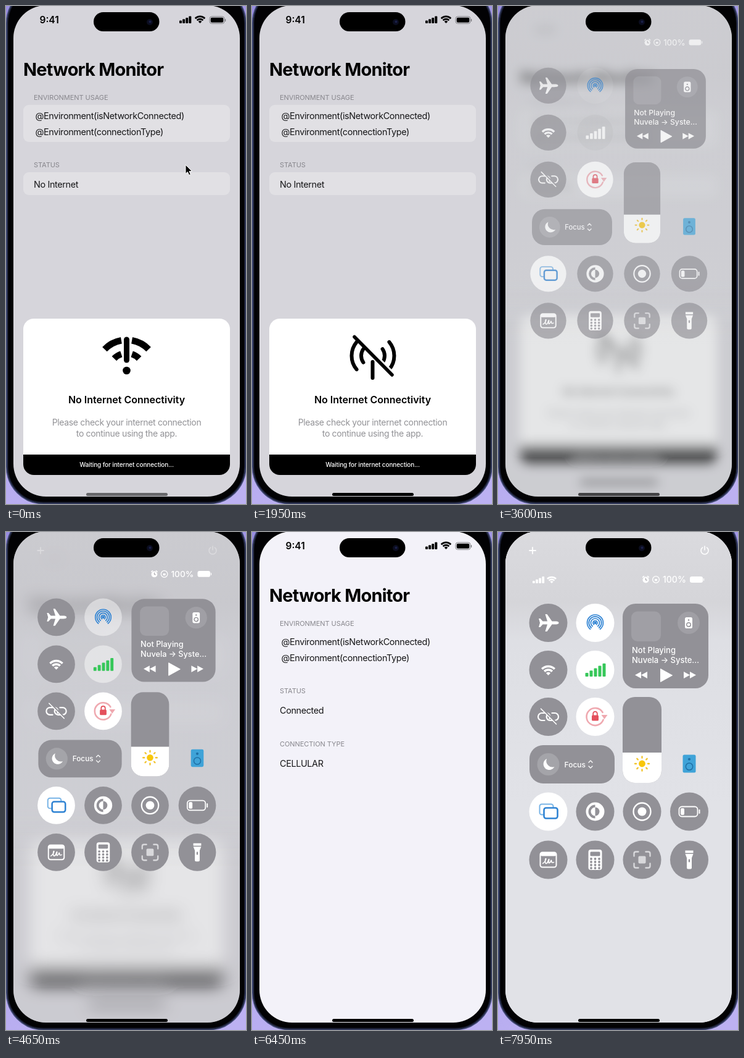
Animation, 389 px wide and 806 px high, one loop 8000 ms. Source, as an HTML page:

```html
<!DOCTYPE html>
<html lang="en">
<head>
<meta charset="utf-8">
<title>Network Monitor</title>
<style>
  html, body { margin: 0; width: 100%; height: 100%; overflow: hidden; background: #a79cea; }
  svg { display: block; width: 389px; height: 806px; font-family: Inter, "Open Sans", sans-serif; }
  .title { font-size: 29px; font-weight: 700; letter-spacing: -.8px; }
  .row { font-size: 14.4px; letter-spacing: -.36px; fill: #161618; }
  .cap { font-size: 11px; letter-spacing: -.06px; fill: #88878d; }
  .head { font-size: 16px; font-weight: 600; letter-spacing: 0; }
  .note { font-size: 14px; letter-spacing: -.33px; fill: #929296; }
  .wait { font-size: 10px; font-weight: 500; letter-spacing: -.12px; fill: #fff; }
  .mid { text-anchor: middle; }
  .line { fill: none; stroke-linecap: round; stroke-linejoin: round; }
</style>
</head>
<body>
<svg viewBox="0 0 389 806">
  <defs>
    <clipPath id="screen"><rect x="12" y="-1" width="367" height="795" rx="53"/></clipPath>
    <clipPath id="card"><rect x="28" y="506" width="335" height="253" rx="17"/></clipPath>
    <clipPath id="slider"><rect x="-31.5" y="-69.5" width="63" height="139" rx="20"/></clipPath>
    <filter id="blur" filterUnits="userSpaceOnUse" x="-30" y="-30" width="449" height="866"><feGaussianBlur id="dev" stdDeviation="0"/></filter>
    <linearGradient id="wall" x2=".3" y2="1"><stop stop-color="#988de0"/><stop offset="1" stop-color="#bcb1f2"/></linearGradient>
    <linearGradient id="haze" x2="0" y2="1">
      <stop stop-color="#dadade"/><stop offset=".14" stop-color="#d5d5d9"/><stop offset=".22" stop-color="#dedfe4"/>
      <stop offset=".55" stop-color="#e1e2e7"/><stop offset=".68" stop-color="#e1e2e7" stop-opacity="0"/>
    </linearGradient>
  </defs>
  <rect width="389" height="806" fill="url(#wall)"/>
  <rect x="1" y="-32" width="387.500" height="837.500" rx="60" fill="#020204" stroke="#3f4770" stroke-width="2"/>
  <rect x="2.800" y="-30" width="384" height="833.500" rx="58" fill="none" stroke="#1c2138" stroke-width="1.500"/>
  <g clip-path="url(#screen)">
    <rect width="389" height="806" fill="#f3f2f9"/>
    <rect id="dimBack" width="389" height="806"/>
    <g id="app">
      <g id="cards" fill="#fff">
        <rect x="28" y="160" width="335" height="60" rx="9"/>
        <rect x="28" y="269" width="335" height="37" rx="9"/>
        <rect id="typeCard" x="28" y="355" width="335" height="37" rx="9"/>
      </g>
      <text class="title" x="28" y="113">Network Monitor</text>
      <text class="cap" x="45" y="152">ENVIRONMENT USAGE</text>
      <text class="row" x="47.500" y="183">@Environment(isNetworkConnected)</text>
      <text class="row" x="47.500" y="208.500">@Environment(connectionType)</text>
      <text class="cap" x="45" y="261">STATUS</text>
      <text class="row" id="status" x="45" y="293.500"></text>
      <g id="type">
        <text class="cap" x="45" y="347">CONNECTION TYPE</text>
        <text class="row" x="45" y="379.500">CELLULAR</text>
      </g>
      <text id="clock" x="54.500" y="28" font-size="15.500" font-weight="600">9:41</text>
      <g id="sheet">
        <g clip-path="url(#card)">
          <rect x="28" y="506" width="335" height="253" fill="#fff"/>
          <rect x="28" y="726" width="335" height="33"/>
        </g>
        <g id="noWifi" class="line" stroke="#000" stroke-width="10.500" style="stroke-linecap:butt"></g>
        <g id="noCell" class="line" stroke="#000" stroke-width="6"></g>
        <text class="head mid" x="195.500" y="642.500">No Internet Connectivity</text>
        <text class="note mid" x="195.500" y="678.500">Please check your internet connection</text>
        <text class="note mid" x="195.500" y="697">to continue using the app.</text>
        <text class="wait mid" x="195.500" y="746">Waiting for internet connection...</text>
      </g>
      <rect id="bar" x="130" y="788" width="132" height="5" rx="2.500"/>
    </g>
    <rect id="tint" width="389" height="806" fill="#e1e2e7"/>
    <rect id="hazeBox" width="389" height="806" fill="url(#haze)"/>
    <rect id="shade" width="389" height="806"/>
    <g id="signs"></g>
    <g id="center"></g>
    <rect id="bar2" x="130" y="788" width="132" height="5" rx="2.500"/>
  </g>
  <rect x="142" y="10" width="106.500" height="31" rx="15.500"/>
  <circle cx="233" cy="26" r="5" fill="#0b0d1f"/><circle cx="233.500" cy="25.500" r="2" fill="#1a2048"/>
  <path id="cursor" d="M291 257v14.500l3.400-3 2.300 5.200 2.600-1.100-2.300-5.100h4.600z" fill="#000" stroke="#fff" stroke-width="1"/>
</svg>
<script>
const LOOP = 8000, STEP = 150;
const $ = id => document.getElementById(id);
const clamp = x => Math.max(0, Math.min(1, x));
const span = (t, from, length) => clamp((t - from) / length);
const smooth = x => x * x * (3 - 2 * x);
const set = (id, name, value) => $(id).setAttribute(name, value);
const fade = (id, value) => set(id, 'opacity', clamp(value).toFixed(3));

// Angles run clockwise from straight up.
function arc(x, y, r, from, to) {
  const p = a => [x + r * Math.sin(a * Math.PI / 180), y - r * Math.cos(a * Math.PI / 180)].map(v => v.toFixed(2));
  return `M${p(from)}A${r} ${r} 0 ${to - from > 180 ? 1 : 0} 1 ${p(to)}`;
}
const path = (d, extra = '') => `<path d="${d}" ${extra}/>`;
const rect = (x, y, w, h, r, extra = '') => `<rect x="${x}" y="${y}" width="${w}" height="${h}" rx="${r}" ${extra}/>`;
const disc = (x, y, r, extra = '') => `<circle cx="${x}" cy="${y}" r="${r}" ${extra}/>`;
const text = (x, y, size, s) => `<text x="${x}" y="${y}" font-size="${size}" font-weight="500">${s}</text>`;
const line = (color, w) => `class="line" stroke="${color}" stroke-width="${w}"`;

function wifi(x, y, k, color) {
  const cap = `fill="none" stroke="${color}" stroke-width="${2.5 * k}"`;
  return path(arc(x, y, 10 * k, -45, 45) + arc(x, y, 6.2 * k, -45, 45), cap) +
    path(arc(x, y, 3.6 * k, -45, 45) + `L${x} ${y}z`, `fill="${color}"`);
}
function bars(x, y, count, w, gap, low, rise, color) {
  let s = '';
  for (let i = 0; i < count; i++) {
    const h = low + rise * i;
    s += rect(x + i * gap, y - h, w, h, 1, `fill="${color}"`);
  }
  return s;
}

$('noWifi').innerHTML =
  path([[49.5, 10], [28, 18]].map(([r, gap]) => arc(195.5, 590, r, -46, -gap) + arc(195.5, 590, r, gap, 46)).join('')) +
  path('M195.500 540V573', 'stroke-linecap="round" stroke-width="9"') + disc(195.5, 590, 6.3, 'fill="#000" stroke="none"');
$('noCell').innerHTML =
  path([[34.5, 40], [19, 45]].map(([r, a]) => arc(196, 566, r, a + 10, 170 - a) + arc(196, 566, r, 190 + a, 350 - a)).join('')) +
  path('M195.500 576V602') + path('M169 535L231 597', 'stroke="#fff" stroke-width="6"') +
  path('M166 535.500L227 597', 'stroke-width="5.500"');

$('signs').innerHTML = bars(281, 28, 4, 4, 5.1, 4.5, 2.3, '#000') + wifi(314.5, 28, 1.1, '#000') +
  `<g id="cell">${rect(330, 17, 24, 11.5, 3.6, 'fill="none" stroke="#7c7c80"')}${rect(331.7, 18.700, 20.6, 8.1, 2)}` +
  path('M355.500 21v4', 'stroke="#7c7c80" stroke-width="1.300"') + '</g>';

const GREY = '#929197', BLUE = '#2f83d3';
const items = [];
function item(x, y, body, extra = 0, id = '') {
  items.push({ x, y, extra, id });
  $('center').insertAdjacentHTML('beforeend', `<g>${body}</g>`);
}
const knob = (body, fill = GREY, id = '') => disc(0, 0, 31, `fill="${fill}" ${id && `id="${id}"`}`) + body;
const col = [81.5, 157.5, 233.5, 310];
const speaker = (w, h, color, hole) => rect(-w / 2, -h / 2, w, h, 2.5, `fill="${color}"`) +
  disc(0, h * .16, w * .27, `fill="none" stroke="${hole}" stroke-width="1.500"`) + disc(0, -h * .25, w * .1, `fill="${hole}"`);

// Top buttons and status line
item(56, 30, path('M-5 0H5M0-5V5', line('#fff', 1.8)), -9, 'top');
item(335, 30, path(arc(0, 0, 6, 35, 325) + 'M0-7V-1', line('#fff', 1.6)), -9, 'top');
item(75, 77, bars(-19, 6, 4, 3.8, 5.1, 4, 2.3, '#fff') + wifi(12, 6, 1, '#fff'), 0, 'left');
item(286, 77,
  disc(-46.5, .5, 5, 'fill="#fff"') + path('M-51.300-3.800l1.800-1.500M-41.700-3.800l-1.800-1.500', line('#fff', 1.6)) +
  path('M-46.500-2V1h2', line(GREY, .9)) + disc(-30, 0, 5.4, 'fill="none" stroke="#fff" stroke-width="1.300"') +
  rect(-32, -1, 4, 3.3, .6, 'fill="#fff"') + text(-19, 5, 14, '100%') +
  rect(25, -5, 21, 10, 3.2, 'fill="#fff"') + path('M47.500-1.500v3', line('#fff', 1.2)));

// Grid
item(col[0], 147, knob(path('M17 0C17-2 14-2.500 11-2.500H6L-2-14H-5L-1.500-2.500H-9L-13-7H-15.500L-13.500 0-15.500 7H-13L-9 2.500H-1.500L-5 14H-2L6 2.500H11C14 2.500 17 2 17 0z', 'fill="#fff"')));
item(col[1], 147, knob(path([3.5, 7, 10.2, 13].map(r => arc(0, 0, r, -142, 142)).join(''), line(BLUE, 1.7)) + disc(0, 0, 2.2, `fill="${BLUE}"`), '#fff', 'drop'));
item(col[0], 223, knob(wifi(0, 9, 1.45, '#fff')));
item(col[1], 223, knob(`<g id="off">${bars(-16, 11, 5, 5, 7, 6, 3.8, '#fff')}</g><g id="on">${bars(-16, 11, 5, 5, 7, 6, 3.8, '#36c759')}</g>`, '#fff', 'data'));
const loop = 'M-6 6H-10.500A6 6 0 0 1-10.500-6H-3A6 6 0 0 1 2 3';
item(col[0], 299, knob(path(loop, line('#fff', 2.2)) + path(loop, 'transform="rotate(180)" ' + line('#fff', 2.2)) +
  path('M-10-13L14 11', line(GREY, 3)) + path('M-12-13L13 12', line('#fff', 1.6))));
item(col[1], 299, knob(path(arc(0, 0, 14, 110, 420), line('#efa9b0', 2.6)) + path('M10-3H20L15 4z', 'fill="#efa9b0"') +
  rect(-5.5, -2.5, 11, 9, 1.6, 'fill="#e4505c"') + path('M-3.300-2V-5A3.300 3.300 0 0 1 3.300-5V-2', line('#e4505c', 1.8)), '#fff'));
const skip = 'M-10-5.500V5.500L0 0zM0-5.500V5.500L10 0z';
item(271.5, 184.5, rect(-69.5, -68.5, 139, 137, 21, `fill="${GREY}"`) +
  rect(-55.5, -56, 48, 48.5, 10, 'fill="#fff" fill-opacity=".13"') + disc(37.5, -37.5, 18, 'fill="#fff" fill-opacity=".13"') +
  `<g transform="translate(37.500 -37.500)">${speaker(12, 18, '#fff', GREY)}</g>` +
  text(-54.5, 11, 13, 'Not Playing') + text(-54.5, 27, 13, 'Nuvela → Syste…') +
  path(skip, 'transform="translate(-39.500 47) scale(-1 1)"') + path('M-8-10.500V10.500L11 0z', 'transform="translate(0 47.500)" stroke="#fff" stroke-linejoin="round"') +
  path(skip, 'transform="translate(39.500 47)"'), 0, 'media');
let rays = '';
for (let i = 0; i < 8; i++) rays += `<path d="M0-9.500V-11.500" transform="rotate(${i * 45})"/>`;
item(col[2], 336.5, `<g clip-path="url(#slider)">${rect(-32, -70, 64, 140, 0, `fill="${GREY}"`)}${rect(-32, 20.5, 64, 50, 0, 'fill="#fff"')}</g>` +
  `<g transform="translate(0 38.500)" ${line('#f2c52f', 2.4)}>${disc(0, 0, 5.4, 'fill="#f8c60a" stroke="none"')}${rays}</g>`);
item(col[3], 375, speaker(21, 29, '#3fa3d8', '#1f6fa5'));
item(120, 376, rect(-69, -31, 138, 62, 22, `fill="${GREY}"`) + disc(-38.5, 0, 18, 'fill="#fff" fill-opacity=".17"') +
  path('M-41-9A9.500 9.500 0 1 0-28.500 4A10 10 0 0 1-41-9z') + text(-12.5, 4.5, 12, 'Focus') +
  path('M27-3l3-3 3 3M27 3l3 3 3-3', line('#fff', 1.3)));
item(col[0], 452.5, knob(rect(-14, -12, 22, 17, 3.5, 'fill="none" stroke="#78b4e6" stroke-width="2"') +
  rect(-7, -6, 22, 17, 3.5, `fill="#fff" stroke="${BLUE}" stroke-width="2.600"`), '#fff'), 1);
item(col[1], 452.5, knob(disc(0, 0, 13, 'fill="none" stroke="#fff" stroke-width="4"') + path('M0-13A13 13 0 0 1 0 13V7A7 7 0 0 1 0-7z') + path('M0-7A7 7 0 0 1 0 7z', `fill="${GREY}"`)), 1);
item(col[2], 452.5, knob(disc(0, 0, 14, 'fill="none" stroke="#fff" stroke-width="2.300"') + disc(0, 0, 7)), 1);
item(col[3], 452.5, knob(rect(-16.5, -8, 30, 16, 4.5, 'fill="none" stroke="#fff" stroke-width="1.800"') + rect(-14, -5.5, 6, 11, 2) + path('M16.500-2.500v5', line('#fff', 2))), 1);
item(col[0], 530.5, knob(rect(-13, -12, 26, 24, 3.5, 'fill="none" stroke="#fff" stroke-width="2"') + rect(-13, -12, 26, 6, 3) +
  path('M-9 6C-5 4-3-2-4-2S-6 7-3 6 0-1 1-1-1 7 2 5 4 0 5 1 4 6 9 4', line('#fff', 1.6))), 3);
let keys = '';
for (let i = 0; i < 12; i++) keys += disc(-6.5 + 6.5 * (i % 3), -1.5 + 5 * Math.floor(i / 3), 1.9, `fill="${GREY}"`);
item(col[1], 530.5, knob(rect(-11, -16.5, 22, 33, 4) + rect(-8, -13, 16, 7, 1.5, `fill="${GREY}"`) + keys), 3);
const corner = 'M-13-6V-10Q-13-13-10-13H-6';
item(col[2], 530.5, knob([0, 90, 180, 270].map(a => path(corner, `transform="rotate(${a})" ` + line('#d8d8db', 2.4))).join('') +
  rect(-6, -6, 12, 12, 2, 'fill="#d8d8db"')), 3);
item(col[3], 530.5, knob(path('M-6.500-15H6.500V-11H-6.500zM-6.500-9.500H6.500L4-3V13Q4 15 2 15H-2Q-4 15-4 13V-3z') + rect(-1.2, -1, 2.4, 5, 1.2, `fill="${GREY}"`)), 3);
$('center').setAttribute('fill', '#fff');
const nodes = [...$('center').children];

function sheetState(t) {
  const out = span(t, 0, 450), back = span(t, 1050, 600), leave = span(t, 4950, 600);
  if (t < 1050) return { drop: 300 * smooth(out), dim: 1 - out, online: t >= 150 };
  if (t < 4950) return { drop: 300 * (1 - back) ** 3.3, dim: 1 - (1 - back) ** 3.3, online: false };
  return { drop: 300 * smooth(leave), dim: 1 - span(t, 4950, 300), online: t > 4950 };
}
function panelState(t) {
  const open = from => 1 - (1 - span(t, from, 750)) ** 1.8;
  if (t < 4500) return open(3300);
  return t < 7200 ? 1 - span(t, 4500, 450) ** 1.26 : open(7200);
}

function draw(t) {
  const { drop, dim, online } = sheetState(t);
  const q = panelState(t), closing = t > 4500 && t < 5000;
  const away = (1 - q) / .25, dy = -9 * away ** 1.5, size = Math.max(.3, 1 - .02 * away ** 2.33);

  set('app', 'transform', `translate(195 370) scale(${1 - .06 * q - .03 * q * q}) translate(-195 -370)`);
  if (q) set('app', 'filter', 'url(#blur)'); else $('app').removeAttribute('filter');
  set('dev', 'stdDeviation', 4 * q + 20 * q * q);
  fade('dimBack', .12 * dim);
  fade('cards', Math.max(.27 * dim, q * 2 * (1 - dim)));
  $('status').textContent = online ? 'Connected' : 'No Internet';
  fade('type', online ? 1 : 0);
  fade('typeCard', online ? 1 : 0);
  fade('clock', 1 - q);
  set('sheet', 'transform', `translate(0 ${drop.toFixed(2)})`);
  fade('noWifi', t < 1050 ? 1 : 0);
  fade('noCell', t < 1050 ? 0 : 1);
  set('bar', 'fill', t < 150 ? '#68686b' : '#000');
  fade('cursor', t < 150 ? 1 : 0);

  fade('tint', (closing ? .6 : 1) * q * q);
  fade('hazeBox', q ** 3);
  fade('shade', .05 * dim * clamp(q * 1.5) + .08 * q * (1 - q));
  set('signs', 'transform', `translate(${-9 * q} ${45 * q})`);
  fade('signs', (.55 - q) * 5);
  fade('cell', 1 - q * 2);
  fade('bar2', (q - .4) / .3);

  const live = t >= 4050;
  set('data', 'fill', live ? '#fff' : GREY);
  fade('on', live ? 1 : 0);
  fade('off', live ? 0 : 1);
  for (const id of ['drop', 'data']) set(id, 'fill-opacity', clamp(1 - (1 - q) * 2.2));
  const show = { media: (q - .3) / .4, top: (q - .65) * 3, left: (q - .8) * 5 };
  items.forEach((it, i) => {
    const shift = it.y + dy - it.extra * Math.min(away, 1);
    const lift = it.id === 'top' ? it.y : shift;
    nodes[i].setAttribute('transform', `translate(${it.x} ${lift.toFixed(2)}) scale(${size.toFixed(3)})`);
    nodes[i].setAttribute('opacity', clamp(it.id in show ? show[it.id] : (q - .4) / .3).toFixed(3));
  });
}

// The picture advances in fixed steps.
let last = -1;
function tick() {
  const t = Math.floor(performance.now() % LOOP / STEP) * STEP;
  if (t !== last) draw(last = t);
  requestAnimationFrame(tick);
}
tick();
</script>
</body>
</html>
```
